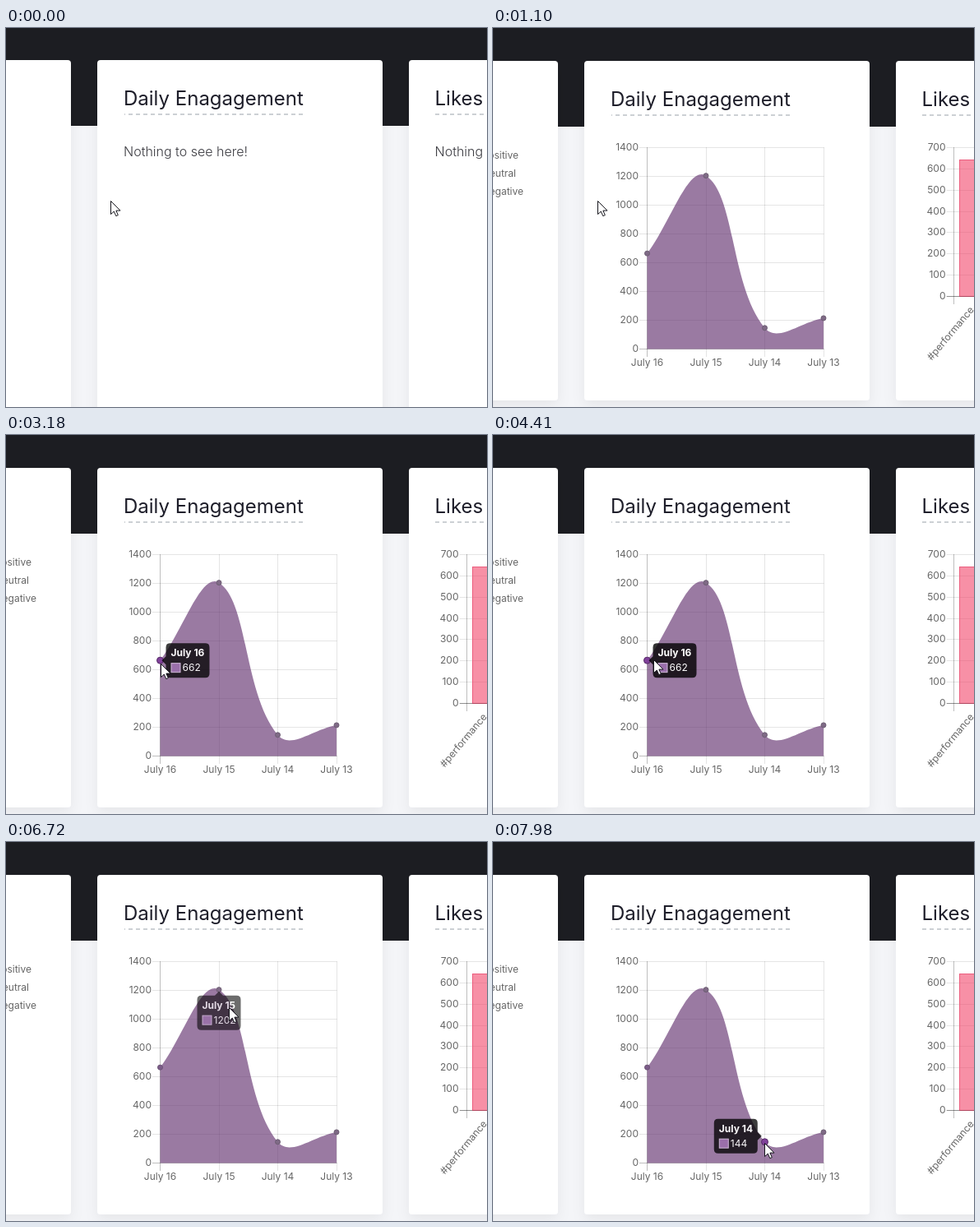
Write an HTML page that moves like this. It is 585x461 px and loops after 8000 ms.

```html
<!DOCTYPE html>
<html lang="en">
<head>
<meta charset="utf-8">
<title>Engagement dashboard</title>
<style>
  html, body { margin: 0; width: 100%; height: 100%; overflow: hidden; background: #f4f5f8; }
  svg { display: block; width: 585px; height: 461px; font-family: Inter, "Liberation Sans", sans-serif; }
  .title { font-size: 24px; fill: #1d1d29; }
  .note { font-size: 16px; font-weight: 300; fill: #3c3c42; }
  .label { font-size: 12px; fill: #666; }
  .rule { stroke: #ccd0d4; stroke-width: 2; stroke-dasharray: 5 4; }
  .grid { stroke: #000; stroke-opacity: .1; }
  .axis { stroke: #000; stroke-opacity: .25; }
  .tip text { font-size: 12px; fill: #fff; }
</style>
</head>
<body>
<svg id="stage" viewBox="0 0 585 461" xmlns="http://www.w3.org/2000/svg">
  <defs>
    <filter id="shade" x="-20%" y="-20%" width="140%" height="140%">
      <feDropShadow dx="0" dy="6" stdDeviation="8" flood-color="#000" flood-opacity=".06"/>
    </filter>
  </defs>
  <rect width="585" height="461" fill="#f4f5f8"/>
  <g id="page">
    <rect y="-5" width="585" height="124" fill="#1c1d22"/>
    <g id="cards" fill="#fff" filter="url(#shade)"></g>
    <text class="title" x="143" y="94">Daily Enagagement</text>
    <path class="rule" d="M144 105H364" stroke-dashoffset="4"/>
    <text class="title" x="521.5" y="94">Likes</text>
    <path class="rule" d="M522 105H600"/>
    <g id="empty" class="note">
      <text x="143" y="156">Nothing to see here!</text>
      <text x="521.5" y="156">Nothing</text>
    </g>
  </g>
  <g id="charts">
    <g id="legend"></g>
    <g id="scales"></g>
    <rect id="bar" x="567.5" width="40" fill="rgb(242,71,107)" fill-opacity=".6" stroke="#ec5f7f"/>
    <path class="axis" d="M552 326.5H585"/>
    <path id="area" fill="rgb(100,52,112)" fill-opacity=".65"/>
    <g id="dots"></g>
    <g id="tip" class="tip">
      <path id="bubble" fill="#000" fill-opacity=".8"/>
      <text id="tipTitle" x="6" y="16" font-weight="700"></text>
      <rect x="6.5" y="24.5" width="11" height="11" fill="#9a6fab" stroke="#d3bddb"/>
      <text id="tipValue" x="20" y="34"></text>
    </g>
  </g>
  <path id="cursor" d="M.5 .5V16.6L4.3 13.1L6.8 18.7L9.3 17.6L6.9 12.1H12Z" fill="#fff" stroke="#15151c" stroke-linejoin="round"/>
</svg>
<script>
const LOOP = 8000, BASE = 390, TIP_W = 53, TIP_H = 42;
const $ = id => document.getElementById(id);

function add(parent, tag, attrs, text) {
  const el = document.createElementNS("http://www.w3.org/2000/svg", tag);
  for (const k in attrs) el.setAttribute(k, attrs[k]);
  if (text !== undefined) el.textContent = text;
  $(parent).appendChild(el);
  return el;
}
const set = (id, attrs) => { for (const k in attrs) $(id).setAttribute(k, attrs[k]); };
const clamp = v => Math.max(0, Math.min(1, v));
const lerp = (a, b, p) => a + (b - a) * p;
const easeOut = p => 1 - (1 - clamp(p)) ** 4;

const days = ["July 16", "July 15", "July 14", "July 13"];
const values = [662, 1202, 144, 212];
const pts = values.map((v, i) => [187.5 + i * 71.5, BASE - v * .175]);

// Spline handles with tension .4, weighted by distance to each neighbour
const handles = pts.map((p, i) => {
  const a = pts[i - 1] || p, b = pts[i + 1] || p;
  const da = Math.hypot(p[0] - a[0], p[1] - a[1]);
  const db = Math.hypot(b[0] - p[0], b[1] - p[1]);
  const at = k => [p[0] + k * (b[0] - a[0]), Math.min(BASE, p[1] + k * (b[1] - a[1]))];
  return { before: at(-.4 * da / (da + db)), after: at(.4 * db / (da + db)) };
});

// Static parts
[-268, 111, 490].forEach(x =>
  add("cards", "rect", { x, y: 39, width: 347, height: 440, rx: 4, class: "card" }));
[["Positive", 31], ["Neutral", 28], ["Negative", 37]].forEach(([s, x], i) =>
  add("legend", "text", { class: "label", x, y: 159 + i * 22, "text-anchor": "end" }, s));

function yScale(x, right, top, step, count, unit) {
  for (let i = 0; i <= count; i++) {
    const y = Math.round(top + i * step) + .5;
    add("scales", "path", { class: i === count ? "axis" : "grid", d: `M${x - 9} ${y}H${right}` });
    add("scales", "text", { class: "label", x: x - 10, y: y + 3.9, "text-anchor": "end" }, (count - i) * unit);
  }
}
yScale(187, 402.5, 145, 35, 7, 200);
yScale(560.5, 600, 145, 181 / 7, 7, 100);
days.forEach((day, i) => {
  const x = Math.floor(pts[i][0]) + .5;
  add("scales", "path", { class: i ? "grid" : "axis", d: `M${x} 145V400` });
  add("scales", "text", { class: "label", x: pts[i][0], y: 411, "text-anchor": "middle" }, day);
});
add("scales", "path", { class: "axis", d: "M560.5 145V336" });
add("scales", "text", {
  class: "label", y: 4, "text-anchor": "end", transform: "translate(582.5 340.5) rotate(-50)"
}, "#performance");
const dots = pts.map(p => add("dots", "circle", { cx: p[0] }));

// Bursts of screen updates: start, end, number of updates
const bursts = [
  [90, 1100, 14], [2630, 3260, 9], [4410, 5090, 10],
  [5190, 5500, 5], [6720, 7490, 11], [7570, 7980, 6]
];
function snap(t) {
  let s = 0;
  for (const [a, b, n] of bursts) {
    if (t < a) break;
    const step = (b - a) / (n - 1);
    s = a + Math.min(n - 1, Math.floor((t - a) / step + 1e-6)) * step;
  }
  return s;
}

// Pointer path: time, x, y
const path = [
  [0, 127, 210], [2560, 127, 210], [2630, 130, 215], [2950, 187, 277], [3030, 188, 278],
  [4330, 188, 278], [4410, 195, 273], [4970, 254, 186], [5090, 258, 181], [5190, 258, 181],
  [5270, 259, 179], [6640, 259, 179], [6720, 271, 201], [7490, 320, 359], [7800, 329.5, 365.5],
  [LOOP, 329.5, 365.5]
];
function pointerAt(t) {
  const i = Math.max(1, path.findIndex(k => k[0] >= t));
  const a = path[i - 1], b = path[i], p = clamp((t - a[0]) / (b[0] - a[0]));
  return [lerp(a[1], b[1], p), lerp(a[2], b[2], p)];
}

// Hovered points, with the resting place of each tooltip
const hovers = [
  { start: 2890, time: 400, end: 4420, side: "left", x: pts[0][0] + 7, y: pts[0][1] - 21 },
  { start: 4972, time: 700, end: 6680, side: "top", x: pts[1][0] - TIP_W / 2, y: pts[1][1] + 7 },
  { start: 7778, time: 375, end: 9999, side: "right", x: pts[2][0] - TIP_W - 7, y: pts[2][1] - 21 }
];

function bubble(side, mid) {
  const w = TIP_W, h = TIP_H, r = 5, c = h / 2;
  const top = side === "top" ? `H${mid - 5}L${mid} -5L${mid + 5} 0` : "";
  const right = side === "right" ? `V${c - 5}L${w + 5} ${c}L${w} ${c + 5}` : "";
  const left = side === "left" ? `V${c + 5}L-5 ${c}L0 ${c - 5}` : "";
  return `M${r} 0${top}H${w - r}Q${w} 0 ${w} ${r}${right}V${h - r}Q${w} ${h} ${w - r} ${h}` +
    `H${r}Q0 ${h} 0 ${h - r}${left}V${r}Q0 0 ${r} 0Z`;
}

function drawTip(t) {
  const i = hovers.findLastIndex(h => t >= h.start);
  $("tip").style.display = i < 0 ? "none" : "";
  if (i < 0) return;
  const h = hovers[i], from = hovers[i - 1] || h;
  const p = easeOut((t - h.start) / h.time);
  const fade = t > h.end ? 1 - easeOut((t - h.end) / 500) : p;
  set("tip", { transform: `translate(${lerp(from.x, h.x, p)} ${lerp(from.y, h.y, p)})`, opacity: fade });
  set("bubble", { d: bubble(h.side, p < .9 ? 11 : TIP_W / 2) });
  $("tipTitle").textContent = days[i];
  $("tipValue").textContent = values[i];
}

function drawDots(t, grow, yAt) {
  dots.forEach((dot, i) => {
    const h = hovers[i], on = h && t >= h.start && t < h.end;
    const look = on ? [4, "#80419a", "#552a66"]
      : grow < 1 ? [3, "#7a5089", "#69437a"]
      : i === 0 && t > h.end ? [3, "#7c5c89", "#6b5375"] : [3, "#7f6a86", "#6e5f74"];
    dot.setAttribute("cy", yAt(pts[i][1]));
    dot.setAttribute("r", look[0]);
    dot.setAttribute("fill", look[1]);
    dot.setAttribute("stroke", look[2]);
  });
}

function draw(time) {
  const t = snap(time), loaded = t >= 90;
  const grow = easeOut((t - 79) / 1000);
  const yAt = y => lerp(BASE, y, grow);
  const xy = p => `${p[0]} ${yAt(p[1])}`;

  set("page", { transform: `translate(0 ${loaded ? 1 : 0})` });
  $("empty").style.display = loaded ? "none" : "";
  $("charts").style.display = loaded ? "" : "none";
  document.querySelectorAll(".card").forEach(c => c.setAttribute("height", loaded ? 413 : 440));

  let d = `M${pts[0][0]} ${BASE + .5}L${xy(pts[0])}`;
  for (let i = 1; i < pts.length; i++)
    d += `C${xy(handles[i - 1].after)} ${xy(handles[i].before)} ${xy(pts[i])}`;
  set("area", { d: `${d}V${BASE + .5}Z` });

  const tall = 166 * grow;
  set("bar", { y: 326.5 - tall, height: tall });
  drawDots(t, grow, yAt);
  drawTip(t);
  set("cursor", { transform: `translate(${pointerAt(t).map(Math.round).join(" ")})` });
}

const begin = performance.now();
function tick() {
  draw((performance.now() - begin) % LOOP);
  requestAnimationFrame(tick);
}
tick();
</script>
</body>
</html>
```
